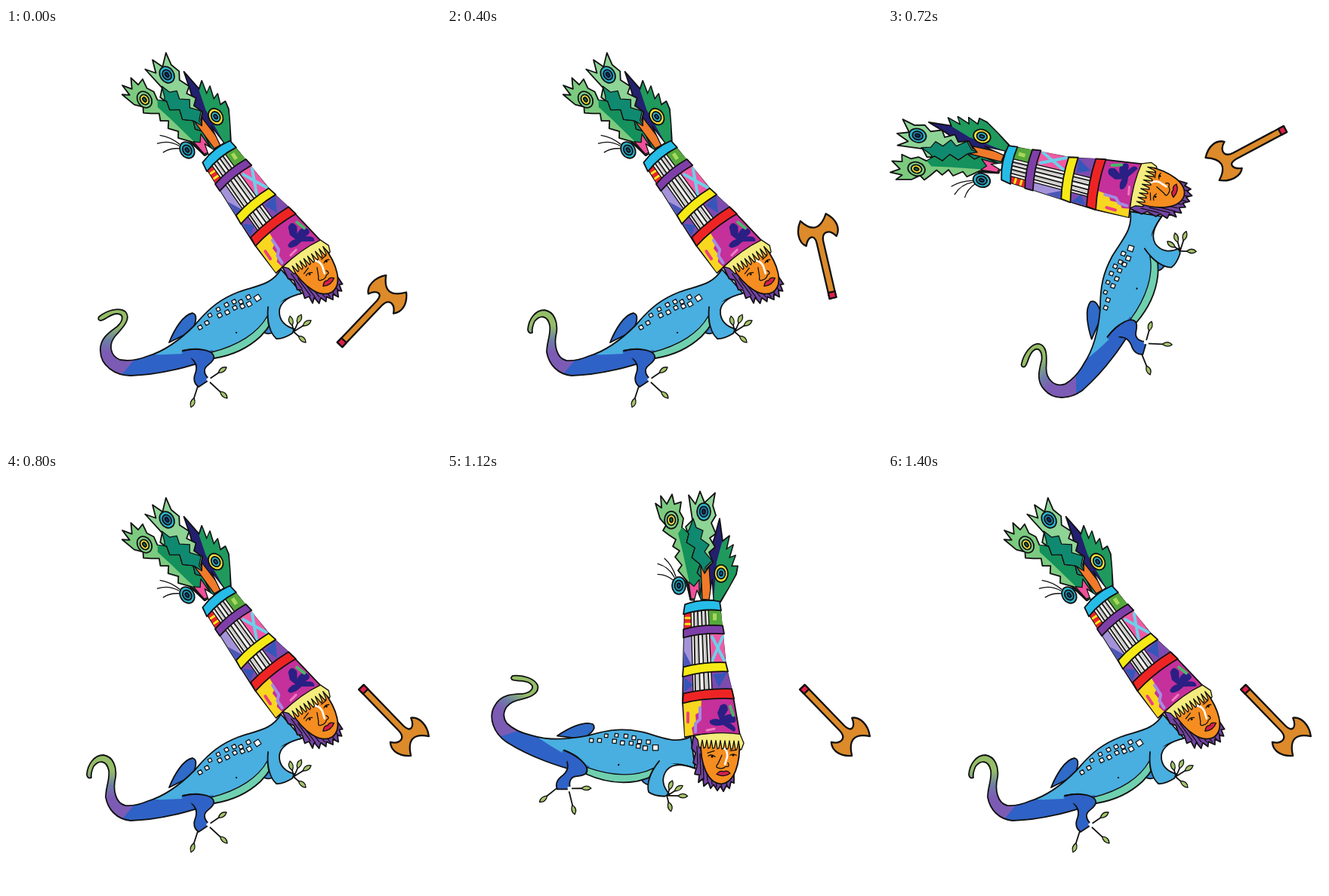
An HTML page for the animation above (1.6 s loop, 576 by 553 pixels).

```html
<!DOCTYPE html>
<html lang="en">
<head>
<meta charset="utf-8">
<title>Lizard and axe</title>
<style>
html, body { margin: 0; width: 100%; height: 100%; overflow: hidden; background: #fff; }
svg { display: block; width: 576px; height: 553px; }
path, ellipse { stroke-linejoin: round; stroke-linecap: round; }
.ink { stroke: #111; stroke-width: 1.8; }
.thin { stroke: #111; stroke-width: 1.3; }
.line { fill: none; }
</style>
</head>
<body>
<svg viewBox="0 0 576 553">
  <defs>
    <path id="body"/>
    <clipPath id="skin"><use href="#body"/></clipPath>
    <linearGradient id="tailFill" gradientUnits="userSpaceOnUse" x1="0" y1="375" x2="0" y2="440">
      <stop offset=".3" stop-color="#94bd68"/>
      <stop offset=".6" stop-color="#6d7fa6"/>
      <stop offset=".85" stop-color="#7c5bb4"/>
    </linearGradient>
  </defs>

  <g id="beast">
    <!-- far limbs -->
    <path class="ink" fill="#2f6bc8" d="M216,417 C222,402 234,380 247,378 C254,380 252,390 246,402Z"/>
    <path class="ink" fill="#3a86d0" d="M346,385 Q336,394 340,403 Q346,407 353,404Z"/>

    <!-- body and tail -->
    <use href="#body" fill="#49aee0"/>
    <g clip-path="url(#skin)">
      <path fill="#2f62c6" d="M140,425 L195,433 Q235,434 274,427 L285,470 H140Z"/>
      <path fill="url(#tailFill)" d="M173,436 L148,466 H90 V360 H173Z"/>
      <path class="thin" fill="#6fd0b0" d="M346,382 C334,404 308,421 272,430 L280,445 L350,412Z"/>
    </g>
    <use href="#body" class="ink line"/>
    <g id="spots" class="thin" fill="#fff"></g>
    <circle cx="305" cy="404" r="1.1"/>

    <!-- near limbs -->
    <path fill="#2f62c6" class="ink" d="M234,428 C258,423 277,428 275,438 C273,446 262,447 263,456 Q264,462 270,466 L255,476 Q247,470 250,460 C255,448 251,440 240,435"/>
    <path fill="#2f62c6" d="M232,429 L242,429 L246,439 L236,436Z"/>
    <path class="ink line" d="M234,428 Q247,425 256,426"/>
    <path fill="#49aee0" class="ink" d="M391,352 C375,356 364,362 362,374 C361,388 370,396 382,399 L379,405 Q366,413 358,412 C350,405 345,390 347,370"/>
    <g id="toes" fill="#a5c46a"></g>
    <path fill="#fff" d="M265,466 l4,-4 3,5 -3,4Z"/>

    <!-- head, drawn upright -->
    <g transform="translate(246 500) rotate(-33.6) translate(-125 -434)">
      <!-- plumes -->
      <path class="ink" fill="#23206f" d="M338,168 L346,110 L354,86 L361,60 L365,90 L374,83 L370,101 L379,95 L374,112 L382,109 L377,123 L385,123 L383,134 L373,152 L362,171Z"/>
      <path fill="#1f9a5c" d="M353,168 L357,118 L364,92 L373,85 L369,102 L378,96 L373,113 L381,110 L376,124 L384,124 L382,134 L373,151 L361,170Z"/>
      <path class="ink" fill="#8ed496" d="M323,168 L310,118 L312,88 L319,80 L316,71 L325,62 L320,29 L329,41 L335,24 L341,39 L355,26 L352,43 L356,56 L350,66 L356,80 L348,86 L355,98 L347,105 L352,118 L344,126 L342,168Z"/>
      <path class="thin" fill="#0f8a70" d="M322,168 L311,118 L314,84 L321,74 L326,60 L330,72 L339,76 L336,87 L347,95 L341,104 L351,116 L342,125 L340,168Z"/>
      <path class="ink" fill="#7cca80" d="M323,168 L318,143 L306,129 L311,122 L302,111 L308,103 L299,97 L303,88 L294,82 L286,76 L290,69 L282,60 L276,40 L284,46 L283,30 L291,41 L298,28 L301,41 L310,38 L308,51 L313,60 L311,72 L320,80 L317,92 L328,99 L324,112 L335,121 L331,132 L338,140 L334,168Z"/>
      <path fill="#14915c" d="M326,168 L318,132 L312,104 L306,80 L311,72 L319,80 L316,92 L327,99 L323,112 L334,121 L330,132 L337,140 L333,168Z"/>
      <path class="thin" fill="#f0509a" d="M323,166 L320,144 L327,150 L334,141 L334,168Z"/>
      <path class="thin" fill="#f07a2a" d="M338,167 L336,122 L341,133 L347,124 L350,168Z"/>
      <path fill="#fff" class="thin" d="M327,170 L331,155 L337,169Z M347,168 L351,140 L353,168Z"/>
      <path class="thin line" d="M301,138 Q294,124 279,120 M303,137 Q298,122 288,113 M300,142 Q290,134 279,134"/>
      <g id="eyes" class="ink"></g>

      <!-- hair -->
      <path class="ink" fill="#7444a4" d="M326,349 L324,365 L329,371 L326,384 L331,388 L328,399 L334,400 L333,410 L339,405 L340,415 L346,410 L349,418 L353,413 L358,421 L362,415 L366,422 L370,414 L374,418 L376,409 L380,411 L380,380 L342,349Z"/>
      <path class="thin line" d="M331,362 l1,24 M335,372 l1,28 M339,384 l1,22 M344,396 l1,12 M350,402 l1,10 M356,407 l1,9 M363,410 l1,8 M370,408 l1,8"/>

      <!-- face -->
      <path class="ink" fill="#f58d20" d="M336,354 C335,386 345,411 363,412 C380,411 389,386 387,354Z"/>
      <path stroke="#fff" stroke-width="2.6" class="line" d="M366,364 Q372,368 371,376 L368,386"/>
      <path class="thin line" d="M345,371 L354,368 M375,368 L383,367 M346,375 Q350,372 355,376 M375,374 Q379,371 383,374 M364,374 L359,385 Q354,390 360,391 Q365,393 369,389 Q375,390 372,384"/>
      <circle cx="351" cy="376" r="1.4"/><circle cx="379" cy="374" r="1.4"/>
      <path class="thin" fill="#d61f4c" d="M357,399 Q362,393 366,396 Q371,393 375,398 Q367,404 357,399Z"/>

      <!-- headdress -->
      <path class="ink" fill="#c5309b" d="M315,176 L313,250 L312,304 L315,350 Q352,342 388,348 L379,296 L369,255 L361,172Z"/>
      <path fill="#e8262c" d="M315,187 L324,184 V207 H314Z"/>
      <path stroke="#f8e71c" stroke-width="3" class="line" d="M316,192 h6 M316,200 h6"/>
      <path fill="#56a83c" d="M346,182 L362,180 L365,203 H347Z"/>
      <path fill="#a8d85a" d="M352,186 h5 v9 h-5Z"/>
      <path fill="#a493d8" d="M314,217 H324 L325,257 H313Z"/>
      <path fill="#4a56b8" d="M314,236 L325,257 H313Z"/>
      <path fill="#f05aa4" d="M347,213 L366,212 L369,252 L349,254Z"/>
      <path stroke="#6cd0ea" stroke-width="4" class="line" d="M351,217 L367,248 M365,217 L351,249"/>
      <path fill="#7e4bae" d="M313,268 H326 V292 H313Z M350,265 L371,262 L378,288 H351Z"/>
      <path fill="#3556b8" d="M314,271 L326,281 L314,290Z M352,267 L371,264 L360,284Z"/>
      <path fill="#f4f2f0" class="thin" d="M323,184 L346,181 L351,289 L326,292Z"/>
      <path stroke="#222" stroke-width="2" class="line" d="M327,184 L329,292 M332,184 L335,292 M337,183 L341,291 M342,182 L347,290"/>
      <path stroke="#aaa" class="line" d="M330,184 L332,292 M340,183 L344,290"/>
      <path fill="#f8d720" d="M313,304 L337,301 L336,316 L329,320 L330,332 L324,338 L326,347 L315,349Z"/>
      <path stroke="#ee3f7c" stroke-width="4" class="line" d="M319,318 V330"/>
      <path stroke="#a48ce0" stroke-width="4" class="line" d="M335,311 V326 L329,332 V343"/>
      <path fill="#2a1f84" d="M362,308 Q371,302 372,314 L367,322 Q377,316 382,324 Q385,332 374,331 Q386,338 380,343 L366,334 L358,335 Q346,334 348,328 Q355,324 361,327 L358,318Z"/>
      <path stroke="#49b868" stroke-width="4" class="line" d="M375,309 L379,321"/>
      <path stroke="#f07ac0" stroke-width="3" class="line" d="M344,341 l10,-2"/>
      <g class="ink">
        <path fill="#25bde8" d="M315,174 Q338,166 361,170 L363,182 Q338,179 313,187Z"/>
        <path fill="#7e3fa8" d="M313,207 Q338,200 365,202 L367,213 Q340,211 313,218Z"/>
        <path fill="#f6ea16" d="M313,257 Q340,250 369,251 L372,263 Q340,262 312,270Z"/>
        <path fill="#ee2424" d="M313,292 Q345,285 377,286 L380,299 Q345,297 312,305Z"/>
      </g>
      <path id="fringe" class="thin" fill="#f4ec7c"/>
    </g>
  </g>

  <g id="axe" stroke="#111" stroke-width="2.3" stroke-linejoin="round">
    <path fill="#dc8a2a" d="M0,-4.5 L76,-4.5 C89,-5 87,-14 75,-19 C81,-28 97,-28 109,-19 Q83,-1 111,16 C100,29 87,30 79,23 C90,16 90,5 76,4.5 L0,4.5Z"/>
    <path fill="#e0204a" d="M0,-4.5 H8 V4.5 H0Z"/>
  </g>
</svg>
<script>
const $ = id => document.getElementById(id);

const trunk = 'M188,435 C212,428 232,412 250,394 C270,370 285,359 308,350 ' +
  'C335,341 352,340 364,320 L392,352 C376,356 360,362 356,376 C354,390 344,402 337,409 ' +
  'C320,425 300,434 276,438 C250,446 210,460 165,461 ';
const tails = {
  hook: 'C145,461 125,448 125,428 C124,412 136,404 147,396 C156,388 156,379 147,379 ' +
    'C138,379 132,387 125,388 Q121,387 123,383 C134,374 150,370 158,376 ' +
    'C167,386 153,399 145,408 C135,420 138,435 151,440 Q168,443 188,435Z',
  curl: 'C146,459 135,446 132,430 C132,416 138,406 136,394 C133,381 123,380 116,389 ' +
    'Q112,398 113,404 Q108,406 107,400 C108,386 117,374 129,374 ' +
    'C142,376 147,390 145,404 C141,420 145,438 158,441 Q172,442 188,435Z'
};

// turn in degrees about the lowest toe, and where that toe lands
const pose = (turn, x, y) => `translate(${x} ${y}) rotate(${turn}) translate(-246 -500)`;
const rest = pose(0, 246, 500), dive = pose(-40, 346, 457), stand = pose(33.6, 125, 434.3);
const axeAt = (x, y, turn) => `translate(${x} ${y}) rotate(${turn})`;
const landed = axeAt(470.5, 284, 46);

const steps = [
  [0, rest, 'hook', axeAt(442, 420, -46.5)],
  [400, rest, 'curl', axeAt(511, 358, -103)],
  [600, dive, 'hook', axeAt(526, 134, 152)],
  [800, rest, 'curl', landed],
  [1000, stand, 'hook', landed],
  [1200, rest, 'hook', landed],
  [1400, rest, 'curl', landed]
];

const spots = [[333, 358, 5], [321, 357, 3.6], [322, 366, 4], [311, 363, 3.4], [313, 369, 3.6],
  [302, 363, 3.4], [303, 371, 3.4], [292, 367, 3.4], [293, 377, 3.6], [281, 373, 3],
  [283, 381, 3.6], [270, 381, 3], [266, 391, 3.4], [257, 397, 3.4]];
$('spots').innerHTML = spots.map(([x, y, r]) =>
  `<path d="M${x - r},${y - 1} L${x + 1},${y - r} L${x + r},${y + 1} L${x - 1},${y + r}Z"/>`).join('');

// each toe: root, then tip, ending in a narrow leaf
const toes = [[381, 402, 376, 382], [382, 401, 391, 380], [382, 402, 404, 388], [381, 403, 397, 417],
  [270, 465, 292, 450], [268, 468, 293, 491], [254, 475, 245, 503]];
$('toes').innerHTML = toes.map(([x, y, tipX, tipY]) => {
  const turn = Math.atan2(tipY - y, tipX - x) * 180 / Math.PI;
  const len = Math.hypot(tipX - x, tipY - y);
  return `<g transform="translate(${x} ${y}) rotate(${turn})">
    <path class="ink" d="M0,0 H${len - 12}"/>
    <path class="thin" d="M${len - 13},0 Q${len - 6},-6 ${len},0 Q${len - 6},5 ${len - 13},0Z"/></g>`;
}).join('');

const eyes = [[297, 62, '#7fcf86', '#f2e23c', '#176c60'], [340, 51, '#2cb4cc', '#1d82b4', '#16306e'],
  [363, 133, '#f2e23c', '#2cb4cc', '#1a55a0'], [307, 149, '#2cb4cc', '#1d96b4', '#164a80']];
$('eyes').innerHTML = eyes.map(([x, y, ...fills]) => fills.map((fill, i) =>
  `<ellipse cx="${x}" cy="${y}" rx="${[9, 5.5, 2][i]}" ry="${[11.5, 7, 3.2][i]}" fill="${fill}"/>`).join('')).join('');

// narrow teeth from right to left
let fringe = 'M327,348 Q360,342 388,346 L393,358';
for (let x = 390; x > 330; x -= 6) {
  const sag = (390 - x) / 60 * 3;
  fringe += ` L${x},${366 - sag} L${x - 2},${367 - sag} L${x - 4},${355 - sag / 2}`;
}
$('fringe').setAttribute('d', fringe + 'Z');

let shown;
function draw(now) {
  const t = now % 1600;
  const step = steps.findLast(s => s[0] <= t);
  if (step !== shown) {
    const [, beast, tail, axe] = shown = step;
    $('beast').setAttribute('transform', beast);
    $('body').setAttribute('d', trunk + tails[tail]);
    $('axe').setAttribute('transform', axe);
  }
  requestAnimationFrame(draw);
}
draw(performance.now());
</script>
</body>
</html>
```
